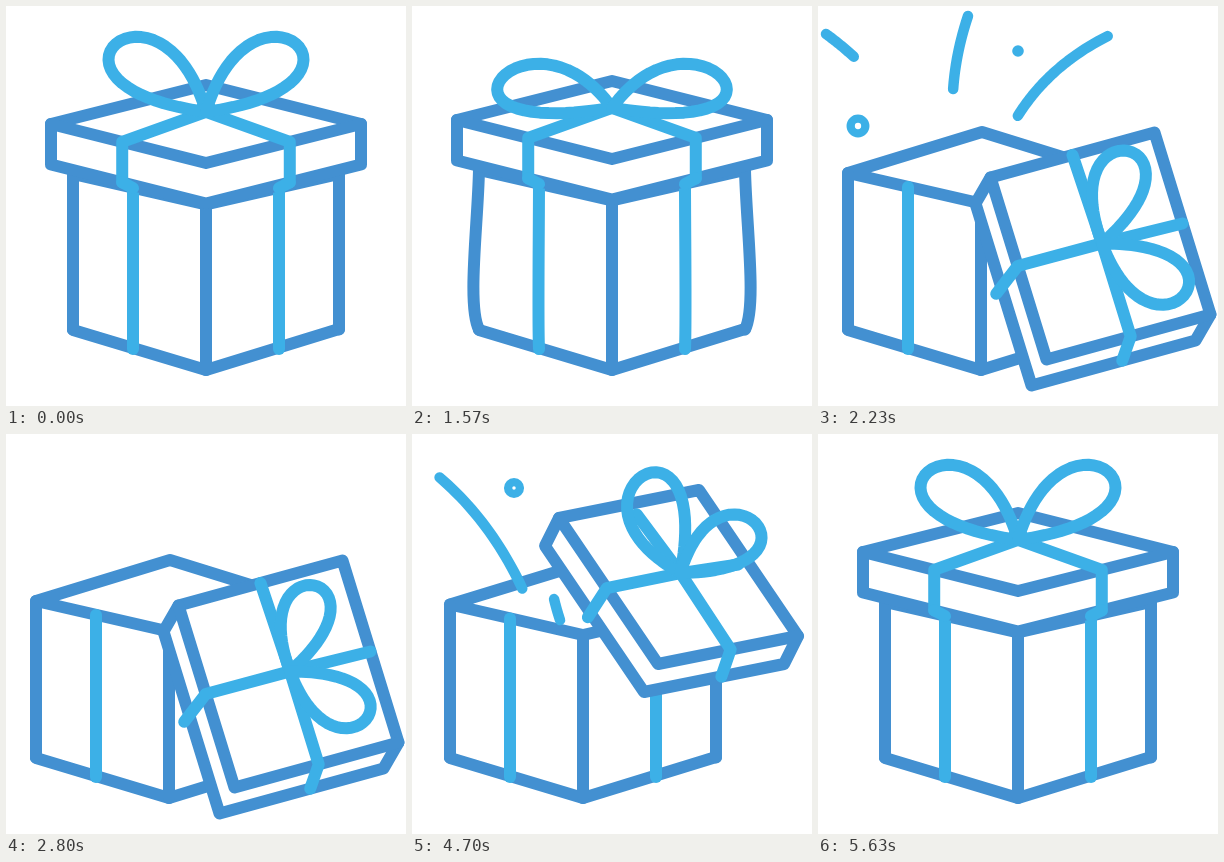
These frames come from a looping animation (400 by 400 pixels, 5660 ms). An HTML page with a canvas:

```html
<!DOCTYPE html>
<html lang="en">
<head>
<meta charset="utf-8">
<title>Gift box</title>
<style>
  html, body { margin: 0; height: 100%; overflow: hidden; background: #fff; }
  canvas { display: block; width: 100%; height: 100%; }
</style>
</head>
<body>
<canvas id="stage" width="400" height="400"></canvas>
<script>
const ctx = document.getElementById('stage').getContext('2d');
const DARK = '#4390d1', LIGHT = '#3cb0e7';
const LOOP = 5660, OPEN_END = 2800, MIRROR = 6630, STEP = 30;

// a + k * b
const plus = (a, b, k = 1) => a.map((v, i) => v + k * b[i]);
const mapPose = (pose, fn) => Object.fromEntries(Object.entries(pose).map(
  ([key, value]) => [key, value.map((v, i) => fn(v, key, i))]));
const mix = (a, b, k) => mapPose(a, (v, key, i) => v + (b[key][i] - v) * k);
const change = (pose, dy, extra) => ({ ...pose, center: plus(pose.center, [0, dy]), ...extra });
const bow = (tip, width) => ({
  tip1: tip, width1: width,
  tip2: [-tip[0], tip[1]], width2: [-width[0], width[1]]
});

// The lid is a parallelogram: its centre, two half edges and a depth vector.
// Each bow loop has a tip and a width vector; rise is the knot's height over the lid.
const closed = {
  center: [200, 118], edge1: [77.5, 19.5], edge2: [77.5, -19.5], depth: [0, 40.5],
  rise: [0.3], tails: [0], ...bow([-90, -68], [28, -24]),
  box: [200, 168], bulge: [0]
};
const raised = change(closed, -4, { ...bow([-110, -30], [24, -28]), box: [200, 164], bulge: [12] });
const flying = {
  center: [266.5, 143], edge1: [49.5, 73], edge2: [70, -14], depth: [-14, 28],
  rise: [0.14], tails: [0.85],
  tip1: [-38, -97], width1: [32, -20], tip2: [75, -50], width2: [-23, -24],
  box: [171, 170.5], bulge: [0]
};
const resting = {
  center: [282.5, 240], edge1: [28, 91], edge2: [82, -22.5], depth: [-15, 26],
  rise: [0.1], tails: [1],
  tip1: [24, -86], width1: [30, 6], tip2: [76, 48], width2: [20, -24],
  box: [163, 167], bulge: [0]
};
const landed = mapPose(resting, (v, key) => /^(tip|width)/.test(key) ? v * 1.08 : v);

const track = [
  [1030, closed],
  [1360, change(mix(closed, raised, 0.5), 6, { box: [200, 171], bulge: [9] })],
  [1570, raised],
  [1750, change(mix(raised, flying, 0.5), -36, { bulge: [-5] })],
  [1930, flying],
  [2200, landed],
  [2740, resting]
];

// Monotone cubic interpolation: smooth through the poses, never overshooting.
function tangent(k, key, i) {
  if (k === 0 || k === track.length - 1) return 0;
  const [a, b] = [k - 1, k].map(n => {
    const [[t0, from], [t1, to]] = track.slice(n, n + 2);
    return (to[key][i] - from[key][i]) / (t1 - t0);
  });
  return a * b > 0 ? 2 * a * b / (a + b) : 0;
}
function poseAt(time) {
  if (time <= track[0][0]) return closed;
  const k = track.findIndex(([end]) => end > time) - 1;
  if (k < 0) return resting;
  const [[t0, from], [t1, to]] = track.slice(k, k + 2);
  const h = t1 - t0, u = (time - t0) / h, blend = u * u * (3 - 2 * u);
  return mapPose(from, (v, key, i) => v + (to[key][i] - v) * blend
    + h * u * (1 - u) * ((1 - u) * tangent(k, key, i) - u * tangent(k + 1, key, i)));
}

function stroke(color, width = 12) {
  ctx.strokeStyle = color;
  ctx.lineWidth = width;
  ctx.stroke();
}
function trace(points) {
  ctx.beginPath();
  points.forEach(p => ctx.lineTo(...p));
}
function line(color, ...points) {
  trace(points);
  stroke(color);
}
const sample = (count, fn) => Array.from({ length: count + 1 }, (_, i) => fn(i / count));

const ribbonTop = ([cx, top], side) => [cx + side * 73, top + 14];

function drawBox({ box, bulge }) {
  const [cx, top] = box;
  const front = [cx, top + 30.5], bottom = [cx, 364];
  line(DARK, [cx - 133, top], [cx + 1, top - 41], [cx + 133, top], front, [cx - 133, top]);
  line(DARK, [cx - 133, 324], bottom, [cx + 133, 323]);
  line(DARK, front, bottom);
  const edge = (color, [x, y0], y1, bend) => {
    const h = y1 - y0;
    ctx.beginPath();
    ctx.moveTo(x, y0);
    ctx.bezierCurveTo(x + bend * 0.1, y0 + h * 0.35, x + bend, y0 + h * 0.85, x, y1);
    stroke(color);
  };
  for (const side of [-1, 1]) {
    edge(DARK, [cx + side * 133, top], 323.5, side * bulge[0]);
    edge(LIGHT, ribbonTop(box, side), 343, side * bulge[0] * 0.1);
  }
}

const easeOut = v => 1 - (1 - Math.max(0, Math.min(1, v))) ** 2;

// A streamer grows along a quadratic curve, then its tail catches up.
function drawStreamer(time, [a, b, c], start, tailStart, tailTime) {
  const head = easeOut((time - start) / 240), tail = easeOut((time - tailStart) / tailTime);
  if (head <= tail) return;
  trace(sample(24, k => {
    const t = tail + (head - tail) * k;
    return a.map((v, n) => v * (1 - t) ** 2 + 2 * b[n] * t * (1 - t) + c[n] * t * t);
  }));
  stroke(LIGHT, 10.5);
}
function drawDot(time, x, y, start) {
  const age = (time - start) / 420;
  if (age <= 0 || age >= 1) return;
  const size = Math.sin(Math.PI * age);
  ctx.beginPath();
  ctx.arc(x, y, 7.5 * size, 0, 7);
  stroke(LIGHT, 8.3 * Math.min(1, 5 * size));
}
function drawConfetti(time) {
  drawStreamer(time, [[118, 172], [80, 80], [8, 28]], 1780, 1900, 600);
  drawStreamer(time, [[148, 186], [120, 100], [150, 10]], 1915, 2050, 500);
  drawStreamer(time, [[180, 150], [210, 70], [290, 30]], 2000, 2150, 550);
  drawDot(time, 102, 54, 1809);
  drawDot(time, 40, 120, 2050);
  drawDot(time, 200, 45, 2200);
  drawDot(time, 319, 81, 2379);
}

function drawLid(pose) {
  const { center, edge1, edge2, depth, box } = pose;
  const [rise] = pose.rise, [tails] = pose.tails;
  const onLid = (u, v) => plus(plus(center, edge1, u), edge2, v);
  const left = onLid(-1, -1), front = onLid(1, -1), right = onLid(1, 1), back = onLid(-1, 1);
  const [lowLeft, lowFront, lowRight] = [left, front, right].map(p => plus(p, depth));
  const knot = plus(center, depth, -rise);

  ctx.fillStyle = '#fff';
  trace([back, left, lowLeft, lowFront, lowRight, right]);
  ctx.closePath();
  ctx.fill();
  stroke(DARK);
  line(DARK, left, front, right);

  const skew = rise * 0.27;
  for (const [side, bend] of [[-1, onLid(-skew, -1)], [1, onLid(1, skew)]]) {
    const end = plus(plus(bend, depth), edge2, side * tails * 0.08);
    line(LIGHT, knot, bend, end);
    if (tails === 0) line(LIGHT, end, ribbonTop(box, side));
  }
  if (tails > 0) {
    for (const edge of [onLid(-1, 0), onLid(0, 1)]) {
      line(LIGHT, knot, plus(knot, plus(edge, knot, -1), tails));
    }
  }
  for (const n of [1, 2]) {
    line(LIGHT, ...sample(48, k => {
      const angle = Math.PI * k;
      const reach = plus(pose['tip' + n], pose['width' + n], 2 * Math.cos(angle));
      return plus(knot, reach, Math.sin(angle) ** 2);
    }));
  }
}

// Opens from the start, rests, then runs the same steps backwards.
function stepTime(now) {
  const t = now % LOOP;
  const snap = (v, round) => round((v - 10) / STEP) * STEP + 10;
  return t < MIRROR - OPEN_END
    ? Math.min(OPEN_END, snap(t, Math.floor))
    : snap(MIRROR - t, Math.ceil);
}

function draw(now) {
  const time = stepTime(now), pose = poseAt(time);
  ctx.fillStyle = '#fff';
  ctx.fillRect(0, 0, 400, 400);
  ctx.lineCap = ctx.lineJoin = 'round';
  drawBox(pose);
  drawConfetti(time);
  drawLid(pose);
}

const begin = performance.now();
function loop() {
  draw(performance.now() - begin);
  requestAnimationFrame(loop);
}
loop();
</script>
</body>
</html>
```
